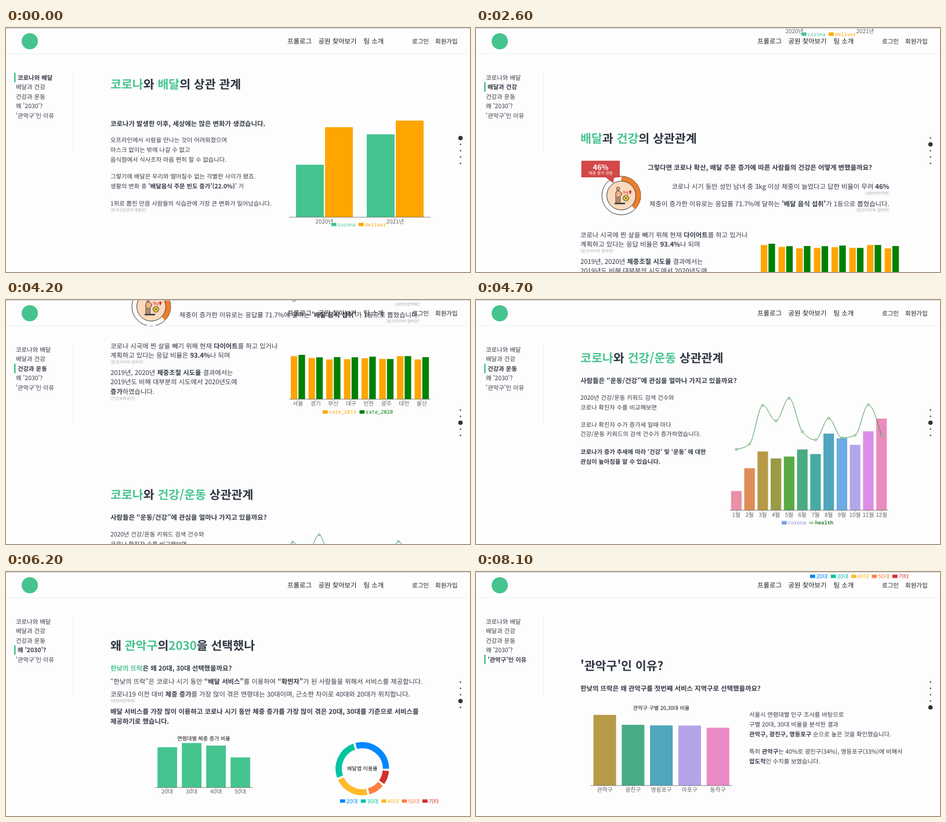
Recreate the animation shown at these times as an HTML page. Size 800 by 423 pixels, loop 8.2 s.

```html
<!DOCTYPE html>
<html lang="ko">
<head>
<meta charset="utf-8">
<title>배달과 건강</title>
<style>
  html, body { margin: 0; width: 100%; height: 100%; overflow: hidden; background: #fefdfe; }
  svg { display: block; width: 100%; height: 100%; }
  text { font-family: "Noto Sans CJK KR", "Noto Sans CJK", sans-serif; fill: #333a45; text-rendering: geometricPrecision; }
  .bold { font-weight: 700; }
  .title { font-weight: 700; fill: #2c3540; }
  .green { fill: #45c48f; }
  .cite { fill: #aaa; }
  .tick { fill: #666; }
  .mono { font-family: "Noto Sans Mono", monospace; }
</style>
</head>
<body>
<svg id="stage" viewBox="0 0 800 423"></svg>
<script>
const LOOP = 8200, STEP = 100, PAGE = 423;
const SCROLL_MS = 700, DOT_MS = 100;
const SCROLL_STARTS = [2265, 4015, 5729, 7714];
const GREEN = '#45c48f', ORANGE = '#ffa500';
const MENU = ['코로나와 배달', '배달과 건강', '건강과 운동', "왜 '2030'?", "'관악구'인 이유"];

// Text is placed by its vertical middle; *bold* and [green] mark inline styles.
function text(x, y, size, str, cls = '', extra = '') {
  const body = str
    .replace(/\*(.+?)\*/g, '<tspan class="bold">$1</tspan>')
    .replace(/\[(.+?)\]/g, '<tspan class="green">$1</tspan>');
  return `<text x="${x}" y="${y + size * 0.38}" font-size="${size}" class="${cls}" ${extra}>${body}</text>`;
}
const MIDDLE = 'text-anchor="middle"', END = 'text-anchor="end"';
const SMALL = 10.3, LARGE = 11.3;
const title = (y, str) => text(180, y, 20.55, str, 'title');
const lead = (x, y, str) => text(x, y, 11.38, str, 'bold');
const small = (y, str, x = 180) => text(x, y, SMALL, str);
const large = (y, str) => text(180, y, LARGE, str);
const largeRight = (y, str) => text(712.5, y, LARGE, str, '', END);
const cite = (y, str, x = 180, extra = '') => text(x, y, 6.9, `(${str})`, 'cite', extra);
const tick = (x, y, str) => text(x, y, 9.8, str, 'tick', MIDDLE);
const caption = (x, y, str) => text(x, y, 9.1, str, '', MIDDLE + ' style="fill:#111"');
const rect = (x, y, w, h, fill) => `<rect x="${x}" y="${y}" width="${w}" height="${h}" fill="${fill}"/>`;
const circle = (x, y, r, attrs) => `<circle cx="${x}" cy="${y}" r="${r}" ${attrs}/>`;
const path = (d, attrs) => `<path d="${d}" ${attrs}/>`;

function legend(x, y, fill, str, cls = 'mono', size = 8.7) {
  return rect(x, y - 2.8, 8.7, 5.8, fill) + text(x + 10.8, y, size, str, cls, `style="fill:${fill}"`);
}

// series: one list of bar tops per colour; colours may also be one per bar
function barChart({ left, base, band, inset, width, gap = 2, labels, series, colors, labelGap = 7.5 }) {
  const right = left + band * labels.length;
  let out = '';
  labels.forEach((label, i) => {
    const start = left + band * i;
    series.forEach((tops, s) => {
      const fill = series.length > 1 ? colors[s] : colors[i % colors.length];
      out += rect(start + inset + s * (width + gap), tops[i], width, base - tops[i], fill);
    });
    out += path(`M${start + band / 2} ${base}v4`, 'stroke="#888" stroke-width=".7"');
    out += tick(start + band / 2, base + labelGap, label);
  });
  return out + path(`M${left} ${base}H${right}`, 'stroke="#666" stroke-width=".8"');
}

// Monotone cubic through evenly spaced points
function monotone(xs, ys) {
  const h = xs[1] - xs[0], n = ys.length;
  const slope = i => (ys[i + 1] - ys[i]) / h;
  const tan = ys.map((_, i) => {
    if (!i || i === n - 1) return 0;
    const a = slope(i - 1), b = slope(i);
    return (Math.sign(a) + Math.sign(b)) * Math.min(Math.abs(a), Math.abs(b), Math.abs(a + b) / 4);
  });
  tan[0] = (3 * slope(0) - tan[1]) / 2;
  tan[n - 1] = (3 * slope(n - 2) - tan[n - 2]) / 2;
  let d = `M${xs[0]} ${ys[0]}`;
  for (let i = 1; i < n; i++) {
    d += `C${xs[i - 1] + h / 3} ${ys[i - 1] + tan[i - 1] * h / 3} ${xs[i] - h / 3} ${ys[i] - tan[i] * h / 3} ${xs[i]} ${ys[i]}`;
  }
  return d;
}

// Ring segment, angles in degrees counter-clockwise from three o'clock
function arc(cx, cy, r, from, to, color, width) {
  const at = a => `${cx + r * Math.cos(a * Math.PI / 180)} ${cy - r * Math.sin(a * Math.PI / 180)}`;
  return path(`M${at(from)}A${r} ${r} 0 ${to - from > 180 ? 1 : 0} 0 ${at(to)}`,
    `fill="none" stroke="${color}" stroke-width="${width}"`);
}

function coronaPage() {
  return title(97, '[코로나]와 [배달]의 상관 관계')
    + lead(180, 165.5, '코로나가 발생한 이후, 세상에는 많은 변화가 생겼습니다.')
    + small(194.5, '오프라인에서 사람을 만나는 것이 어려워졌으며')
    + small(211, '마스크 없이는 밖에 나갈 수 없고')
    + small(228, '음식점에서 식사조차 마음 편히 할 수 없습니다.')
    + small(257.5, '그렇기에 배달은 우리와 떨어질수 없는 각별한 사이가 됐죠.')
    + small(274, "생활의 변화 중 *'배달음식 주문 빈도 증가'(22.0%)*' 가")
    + small(304, '1위로 뽑힌 만큼 사람들의 식습관에 가장 큰 변화가 일어났습니다.')
    + cite(315.5, '한국건강증진개발원')
    + barChart({ left: 488, base: 328, band: 122, inset: 12, width: 48, labels: ['2020년', '2021년'],
        series: [[237, 184.3], [172, 160.5]], colors: [GREEN, ORANGE] })
    + legend(561, 340.5, GREEN, 'corona') + legend(608, 340.5, ORANGE, 'deliver');
}

function weightBadge() {
  const line = 'stroke="#222" stroke-width=".9"';
  return circle(250.5, 197.5, 33.5, `fill="#fff" ${line}`)
    + arc(250.5, 197.5, 29.2, -45, 90, '#ee7d2b', 8)
    + circle(250.5, 197.5, 25, `fill="#fcd9bd" ${line}`)
    + path('M243 189q-3 4-2 10v10h2.6v-9h2.4v9h2.6v-10q4-3 2-6.500q-3-3.500-7.600-3.500z', `fill="#f4b183" ${line}`)
    + circle(245, 185.5, 2.7, `fill="#f4b183" ${line}`)
    + rect(239, 210, 18, 2.5, '#333')
    + circle(258.5, 202, 5, `fill="#ffd34d" ${line}`)
    + path('M255.5 199l6 6m0-6l-6 6', line)
    + text(252.5, 191.5, 6.5, '3kg', '', 'style="fill:#d22"')
    + path('M266 188l3 3.5h-1.8v3h-2.4v-3H263z', 'fill="#d22"')
    + path('M182 137.5h65.5v28h-10l-1 10-13-10H182z', 'fill="#d34848" stroke="#b93c3c" stroke-width=".7"')
    + text(215, 148, 12.5, '46%', 'bold', MIDDLE + ' style="fill:#fff"')
    + text(215, 158, 6.9, '체중 증가 경험', '', MIDDLE + ' style="fill:#fff"');
}

function healthPage() {
  return title(98, '[배달]과 [건강]의 상관관계')
    + weightBadge()
    + lead(296, 149, '그렇다면 코로나 확산, 배달 주문 증가에 따른 사람들의 건강은 어떻게 변했을까요?')
    + largeRight(182, '코로나 시기 동안 성인 남녀 중 3kg 이상 체중이 늘었다고 답한 비율이 무려 *46%*')
    + cite(193.3, '대한비만학회', 713, END)
    + largeRight(211.5, "체중이 증가한 이유로는 응답률 71.7%에 달하는 *'배달 음식 섭취'*가 1등으로 뽑혔습니다.")
    + cite(222.7, '잡코리아와 알바몬', 713, END)
    + large(265.5, '코로나 시국에 찐 살을 빼기 위해 현재 *다이어트*를 하고 있거나')
    + large(282, '계획하고 있다는 응답 비율은 *93.4%*나 되며')
    + cite(293, '잡코리아와 알바몬')
    + large(311.5, '2019년, 2020년 *체중조절 시도율* 결과에서는')
    + large(327.7, '2019년도 비해 대부분의 시도에서 2020년도에')
    + large(344.5, '*증가*하였습니다.')
    + cite(356, '건강보험공단')
    + barChart({ left: 488, base: 358, band: 30.5, inset: 3, width: 11.3,
        labels: ['서울', '경기', '부산', '대구', '인천', '광주', '대전', '울산'],
        series: [[283.3, 286.5, 289, 288.5, 287, 288, 283.2, 289], [281, 285.3, 285, 285.3, 284.2, 288.3, 283.2, 285]],
        colors: [ORANGE, '#008000'] })
    + legend(546, 380, ORANGE, 'rate_2019') + legend(609.5, 380, '#008000', 'rate_2020');
}

function exercisePage() {
  const months = Array.from({ length: 12 }, (_, i) => `${i + 1}월`);
  const xs = months.map((_, i) => 448.9 + 22.75 * i);
  const searches = [259, 249.5, 182.5, 209.5, 170, 228, 242.5, 205, 239, 234.5, 181.5, 235.5];
  const line = 'stroke="#3f9448" stroke-width="1"';
  return title(100.3, '[코로나]와 [건강/운동] 상관관계')
    + lead(180, 140, '사람들은 “운동/건강”에 관심을 얼마나 가지고 있을까요?')
    + small(169, '2020년 건강/운동 키워드 검색 건수와')
    + small(186, '코로나 확진자 수를 비교해보면')
    + small(215.5, '코로나 확진자 수가 증가세 일때 마다')
    + small(232.3, '건강/운동 키워드의 검색 건수가 증가하였습니다.')
    + small(262.5, '*코로나가 증가 추세에 따라 ‘건강’ 및 ‘운동’ 에 대한*')
    + small(279.5, '*관심이 높아짐을 알 수 있습니다.*')
    + barChart({ left: 437.5, base: 364.3, band: 22.75, inset: 2.3, width: 18.2, labels: months,
        series: [[331, 291.5, 262.5, 274.5, 271.3, 259, 267, 231.5, 239.5, 251, 227.5, 205.5]],
        colors: ['#e991a6', '#e08c56', '#b79a47', '#999c45', '#5aa947', '#49ac80',
          '#48aaa2', '#50a7bd', '#6dabe3', '#b1a6ec', '#dd8de6', '#e98bbf'] })
    + path(monotone(xs, searches), `fill="none" ${line}`)
    + xs.map((x, i) => circle(x, searches[i], 1.7, `fill="#fff" ${line}`)).join('')
    + rect(527.5, 383.3, 8, 5.6, '#7aa5e8')
    + path('M527.5 383.3h8v5.6h-8z', 'fill="none" stroke="#555ab0" stroke-width=".6" stroke-dasharray="1 1"')
    + text(537.7, 386, 8.7, 'corona', 'mono', 'style="fill:#8884d8"')
    + path('M574 386.3h8.5', line) + circle(578.3, 386.3, 1.6, `fill="#fff" ${line}`)
    + text(584.8, 386, 8.7, 'health', 'mono bold', 'style="fill:#2f8038"');
}

function agePage() {
  const shares = [['20대', 105, '#0088fe', 576], ['30대', 90, '#00c49f', 611.7], ['40대', 76, '#ffbb28', 647],
    ['50대', 34, '#ff8042', 682.5], ['기타', 30, '#d32f2f', 718]];
  let angle = 0, donut = '';
  for (const [label, sweep, color, x] of shares) {
    donut += arc(614.3, 310.5, 40.8, angle, angle + sweep, color, 10.8) + legend(x, 366.5, color, label, '', 9.6);
    angle += sweep + 5;
  }
  return title(97, '왜 [관악구]의[2030]을 선택했나')
    + lead(180, 136.5, '[한낮의 뜨락]은 왜 20대, 30대 선택했을까요?')
    + large(159, '“한낮의 뜨락”은 코로나 시기 동안 *“배달 서비스”*를 이용하여 *“확찐자”*가 된 사람들을 위해서 서비스를 제공합니다.')
    + large(181.7, '코로나19 이전 대비 *체중 증가*를 가장 많이 겪은 연령대는 30대이며, 근소한 차이로 40대와 20대가 위치합니다.')
    + cite(193.3, '대한비만학회')
    + lead(180, 211.7, '배달 서비스를 가장 많이 이용하고 코로나 시기 동안 체중 증가를 가장 많이 겪은 20대, 30대를 기준으로 서비스를')
    + lead(180, 228.3, '제공하기로 했습니다.')
    + caption(341, 258, '연령대별 체중 증가 비율')
    + barChart({ left: 257, base: 343.3, band: 42, inset: 4.2, width: 33.8, labels: ['20대', '30대', '40대', '50대'],
        series: [[273.3, 266, 270.5, 291]], colors: [GREEN], labelGap: 7 })
    + donut + caption(614.3, 310.3, '배달앱 이용률');
}

function districtPage() {
  const note = (y, str) => small(y, str, 471);
  return title(98, "'관악구'인 이유?")
    + lead(180, 138, '한낮의 뜨락은 왜 관악구를 첫번째 서비스 지역구로 선택했을까요?')
    + caption(319.5, 171.7, '관악구 구별 20,30대 비율')
    + barChart({ left: 197.5, base: 306.3, band: 48.8, inset: 5, width: 39,
        labels: ['관악구', '광진구', '영등포구', '마포구', '동작구'], series: [[183.8, 201, 202, 202.3, 206]],
        colors: ['#b79a47', '#49ac86', '#50a7bd', '#b3a4ea', '#e98bc6'] })
    + note(183.3, '서울시 연령대별 인구 조사를 바탕으로')
    + note(200.5, '구별 20대, 30대 비율을 분석한 결과')
    + note(217.3, '*관악구, 광진구, 영등포구* 순으로 높은 것을 확인했습니다.')
    + note(247.3, '특히 *관악구*는 40%로 광진구(34%), 영등포구(33%)에 비해서')
    + note(264.2, '*압도적*인 수치를 보였습니다.');
}

function header() {
  const link = (x, size, str) => text(x, 22.7, size, str, '', 'style="fill:#1c1c20" font-weight="500"');
  return rect(0, 0, 800, 1, '#d0ccd4') + rect(0, 44, 800, 1, '#f0eff2')
    + circle(41, 23, 14, `fill="${GREEN}"`)
    + link(485, 11.4, '프롤로그') + link(538.5, 11.4, '공원 찾아보기') + link(616.5, 11.4, '팀 소개')
    + link(700, 10.5, '로그인') + link(740, 10.5, '회원가입')
    + rect(115.5, 78, 1, 135, '#e9e9ee');
}

const sidebar = active => MENU.map((label, i) => {
  const y = 86 + 16.4 * i, on = i === active;
  return (on ? rect(14, y - 8.3, 2.6, 16.5, GREEN) : '') + text(on ? 20 : 17, y, 10.4, label, on ? 'bold' : '');
}).join('');

const dots = (active, mix) => MENU.map((_, i) => {
  const grow = i === active ? mix : i === active - 1 ? 1 - mix : 0;
  return circle(783.6, 190.7 + 11 * i, 1.2 + 2.6 * grow, 'fill="#333"');
}).join('');

// CSS "ease": cubic-bezier(.25, .1, .25, 1)
function ease(x) {
  if (x >= 1) return 1;
  let lo = 0, hi = 1;
  for (let i = 0; i < 24; i++) {
    const u = (lo + hi) / 2;
    if (0.75 * u * (1 - u) + u ** 3 < x) lo = u; else hi = u;
  }
  return 0.3 * lo * (1 - lo) ** 2 + 3 * lo * lo * (1 - lo) + lo ** 3;
}

const pages = [coronaPage, healthPage, exercisePage, agePage, districtPage];
const stage = document.getElementById('stage');
stage.innerHTML = '<g id="pages">'
  + pages.map((page, i) => `<g transform="translate(0 ${i * PAGE})">${page()}</g>`).join('')
  + '</g>' + header() + '<g id="nav"></g>';
const pageLayer = document.getElementById('pages'), nav = document.getElementById('nav');

function draw(now) {
  const time = Math.floor(now % LOOP / STEP) * STEP;
  const active = SCROLL_STARTS.filter(start => time >= start).length;
  const elapsed = active ? time - SCROLL_STARTS[active - 1] : Infinity;
  const scroll = active ? PAGE * (active - 1 + ease(elapsed / SCROLL_MS)) : 0;
  pageLayer.setAttribute('transform', `translate(0 ${-scroll})`);
  nav.innerHTML = sidebar(active) + dots(active, Math.min(1, elapsed / DOT_MS));
}

function animate() {
  draw(performance.now());
  requestAnimationFrame(animate);
}
animate();
</script>
</body>
</html>
```
